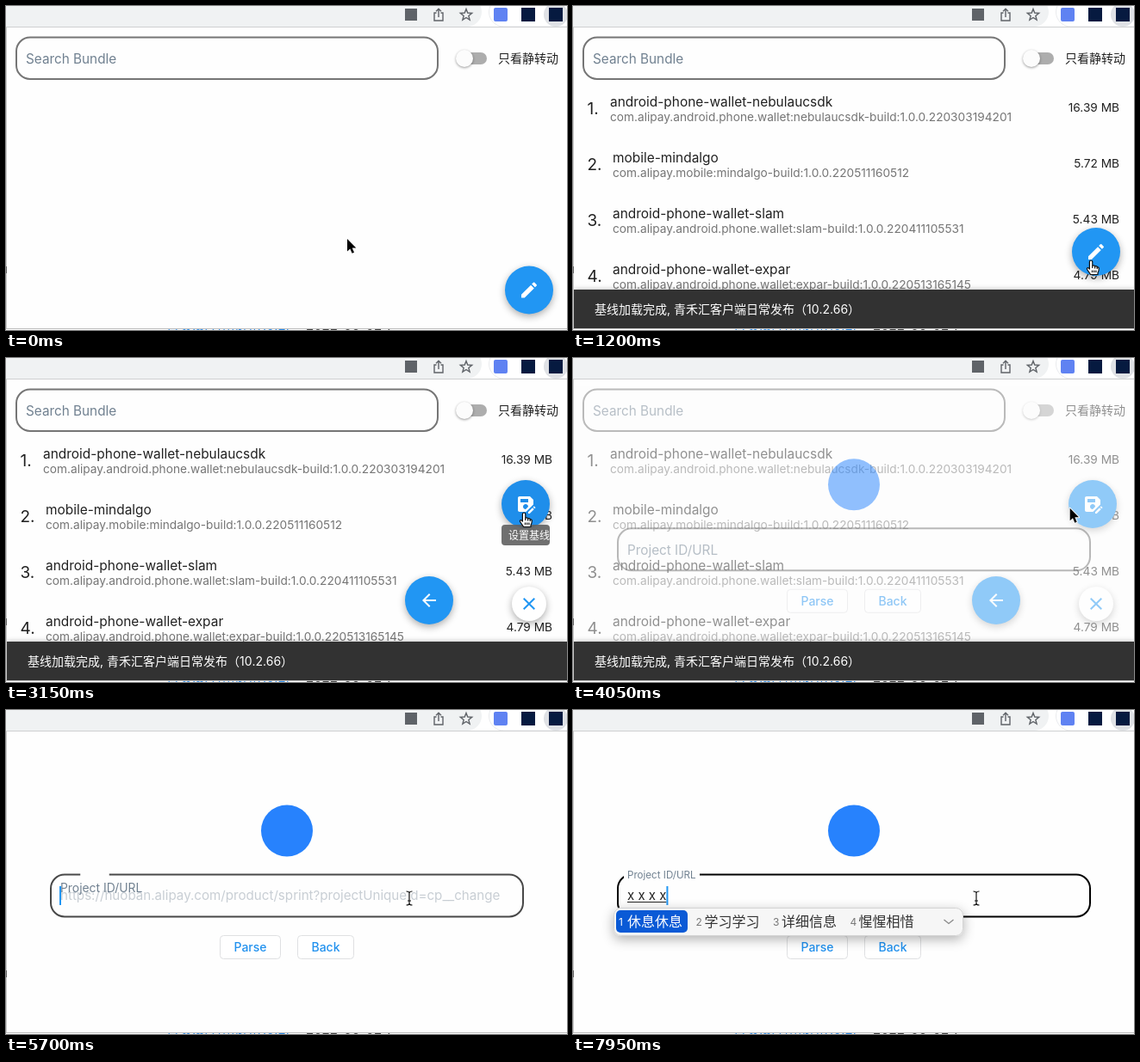
Recreate the animation shown at these times as an HTML page with a canvas. Size 651x377 px, loop 8000 ms.

```html
<!DOCTYPE html>
<html lang="zh-CN">
<head>
<meta charset="utf-8">
<title>Bundle panel</title>
<style>
html, body { margin: 0; width: 100%; height: 100%; overflow: hidden; background: #fff; }
canvas { display: block; width: 651px; height: 377px; }
</style>
</head>
<body>
<canvas id="stage"></canvas>
<script>
const W = 651, H = 377, LOOP = 8000;
const BLUE = '#2196f3', SLATE = '#708090';
const FONT = 'Inter, "Noto Sans CJK SC", "Noto Sans CJK", sans-serif';
const canvas = document.getElementById('stage');
const ctx = canvas.getContext('2d');
const dpr = window.devicePixelRatio || 1;
canvas.width = W * dpr;
canvas.height = H * dpr;

const ICONS = {
  edit: 'M3 17.25V21h3.75L17.81 9.94l-3.75-3.75L3 17.25zM20.71 7.04a1 1 0 0 0 0-1.41l-2.34-2.34a1 1 0 0 0-1.41 0l-1.83 1.83 3.75 3.75 1.83-1.83z',
  back: 'M20 11H7.83l5.59-5.59L12 4l-8 8 8 8 1.41-1.41L7.83 13H20v-2z',
  close: 'M19 6.41L17.59 5 12 10.59 6.41 5 5 6.41 10.59 12 5 17.59 6.41 19 12 13.41 17.59 19 19 17.59 13.41 12z',
  saveAs: 'M21 12.4V7l-4-4H5c-1.11 0-2 .9-2 2v14c0 1.1.89 2 2 2h7.4L21 12.4zM15 15v.06L12.06 18H12c-1.66 0-3-1.34-3-3s1.34-3 3-3 3 1.34 3 3zM6 6h9v4H6V6zm13.99 10.25l1.77 1.77L16.77 23H15v-1.77l4.99-4.98zm3.26.26l-.85.85-1.77-1.77.85-.85c.2-.2.51-.2.71 0l1.06 1.06c.2.2.2.51 0 .71z'
};
for (const k in ICONS) ICONS[k] = new Path2D(ICONS[k]);
const ARROW = new Path2D('M0 0V14.5L3.3 11.4L5.6 16.8L8 15.8L5.7 10.5H10.3Z');
const HAND = new Path2D('M0 0C1.2 0 1.8.8 1.8 2V6.2C2.4 5.6 4.4 5.8 4.6 6.9C5.2 6.3 7 6.6 7.2 7.8C8 7.4 9.3 8 9.3 9.4C9.3 12 8.6 13 8 14.5V16.5H-.5C-1.5 14-3.5 12.5-4.5 10.3C-4.9 9-3.6 8.2-2.6 9L-1.6 10V2C-1.6.8-1 0 0 0Z');

const BUNDLES = [
  ['android-phone-wallet-nebulaucsdk', 'com.alipay.android.phone.wallet:nebulaucsdk-build:1.0.0.220303194201', '16.39 MB'],
  ['mobile-mindalgo', 'com.alipay.mobile:mindalgo-build:1.0.0.220511160512', '5.72 MB'],
  ['android-phone-wallet-slam', 'com.alipay.android.phone.wallet:slam-build:1.0.0.220411105531', '5.43 MB'],
  ['android-phone-wallet-expar', 'com.alipay.android.phone.wallet:expar-build:1.0.0.220513165145', '4.79 MB']
];
const WORDS = ['休息休息', '学习学习', '详细信息', '惺惺相惜'];

// time, x, y, pointer shape
const POINTER = [
  [0, 396, 271, 'arrow'], [150, 396, 271, 'arrow'], [600, 582, 333, 'arrow'],
  [1080, 601, 302, 'hand'], [1190, 601, 296, 'hand'], [2800, 601, 296, 'hand'],
  [2920, 601, 262, 'arrow'], [3090, 601, 190, 'hand'], [3150, 601, 180, 'hand'],
  [3560, 601, 177, 'hand'], [3860, 601, 177, 'arrow'], [4300, 545, 172, 'arrow'],
  [4660, 545, 172, 'ibeam'], [4800, 531, 197, 'ibeam'], [5220, 468, 219, 'ibeam']
];
// row, from, to
const HOVERS = [[3, 440, 1060], [3, 2850, 2920], [2, 2920, 3040]];
const KEYS = [7330, 7600, 7750, 7900];

const clamp = v => Math.max(0, Math.min(1, v));
const ramp = (t, from, len) => clamp((t - from) / len);
const mix = (a, b, p) => a + (b - a) * p;
const smooth = p => p * p * (3 - 2 * p);
const easeOut = p => 1 - (1 - p) ** 2;

// cubic-bezier(.4, 0, .2, 1)
function standard(x) {
  let lo = 0, hi = 1;
  for (let i = 0; i < 20; i++) {
    const s = (lo + hi) / 2, r = 1 - s;
    if (1.2 * r * r * s + 0.6 * r * s * s + s ** 3 < x) lo = s; else hi = s;
  }
  return lo * lo * (3 - 2 * lo);
}

function rect(x, y, w, h, color) {
  ctx.fillStyle = color;
  ctx.fillRect(x, y, w, h);
}
function round(x, y, w, h, r, fill, stroke, line = 1) {
  ctx.beginPath();
  ctx.roundRect(x, y, w, h, r);
  if (fill) { ctx.fillStyle = fill; ctx.fill(); }
  if (stroke) { ctx.strokeStyle = stroke; ctx.lineWidth = line; ctx.stroke(); }
}
function disc(x, y, r, color) {
  ctx.beginPath();
  ctx.arc(x, y, r, 0, Math.PI * 2);
  ctx.fillStyle = color;
  ctx.fill();
}
function text(s, x, y, size, color, align = 'left', weight = 400) {
  ctx.font = `${weight} ${size}px ${FONT}`;
  ctx.textAlign = align;
  ctx.fillStyle = color;
  ctx.fillText(s, x, y);
}
function group(alpha, draw) {
  if (alpha <= 0) return;
  ctx.save();
  ctx.globalAlpha *= alpha;
  draw();
  ctx.restore();
}
function shadow(blur, dy, alpha, draw) {
  ctx.save();
  ctx.shadowColor = `rgba(0,0,0,${alpha})`;
  ctx.shadowBlur = blur * dpr;
  ctx.shadowOffsetY = dy * dpr;
  draw();
  ctx.restore();
}
function button(x, y, r, fill, icon, color, scale = 1, angle = 0) {
  shadow(8, 3, 0.32, () => disc(x, y, r, fill));
  ctx.save();
  ctx.translate(x, y);
  ctx.rotate(angle);
  ctx.scale(scale, scale);
  ctx.translate(-12, -12);
  ctx.fillStyle = color;
  ctx.fill(ICONS[icon]);
  ctx.restore();
}

function toolbar() {
  rect(0, 0, W, 25, '#fff');
  round(-20, -10, 572, 34, 17, '#f0f2f3');
  round(560.5, -10, 120, 34, 17, '#fff', '#e9ebee');
  disc(638, 10, 14, '#dfe1e5');
  rect(463, 3, 14, 14, '#5f6368');
  ctx.strokeStyle = '#5f6368';
  ctx.lineWidth = 1.4;
  ctx.beginPath();
  ctx.moveTo(499.5, 8); ctx.lineTo(497, 8); ctx.lineTo(497, 17); ctx.lineTo(507, 17);
  ctx.lineTo(507, 8); ctx.lineTo(504.5, 8);
  ctx.moveTo(502, 13); ctx.lineTo(502, 3.5);
  ctx.moveTo(499, 6.3); ctx.lineTo(502, 3.3); ctx.lineTo(505, 6.3);
  ctx.stroke();
  ctx.beginPath();
  for (let i = 0; i < 10; i++) {
    const a = Math.PI * (i / 5 - 0.5), r = i % 2 ? 3 : 7;
    ctx.lineTo(534 + r * Math.cos(a), 10.5 + r * Math.sin(a));
  }
  ctx.closePath();
  ctx.stroke();
  round(566, 2, 16, 16, 2, '#5f82f2');
  rect(598, 2, 16, 16, '#061a40');
  rect(630, 2, 16, 16, '#061a40');
}

function backdrop() {
  rect(0, 0, W, H, '#fff');
  text('日安@应用市场(10.2)', 186, 377, 15, '#2b8cea');
  text('2022-06-02 1', 348, 377, 15, '#444');
  rect(0, 24, W, 351, '#fefefe');
  toolbar();
  rect(0, 24, W, 1, '#cfd0d1');
  rect(0, 25, 1, 350, '#c9c9c9');
  rect(0, 303, 1, 8, '#666');
  rect(0, 375, W, 1, '#bdbdbd');
}

function bundleRow(i, hover) {
  const [name, id, size] = BUNDLES[i], y = 86 + 65 * i;
  if (hover > 0) rect(1, y, 650, 65, `rgba(0,0,0,${0.05 * hover})`);
  text(`${i + 1}.`, 16.5, y + 40, 19, '#212121');
  const x = i ? 46 : 43;
  text(name, x, y + 31, 15.45, '#212121');
  text(id, x, y + 48, 13.7, '#757575');
  text(size, 634, y + 37, 13.7, '#212121', 'right');
}

function tooltip(y, alpha) {
  group(alpha, () => {
    round(575, y, 56, 24, 4, 'rgba(97,97,97,.9)');
    text('设置基线', 583, y + 16.5, 12, '#fff');
  });
}

function speedDial(t, y) {
  const v = ramp(t, 1850, 250);
  if (v === 0) {
    button(607, y, 28, BLUE, 'edit', '#fff');
    return;
  }
  const p = standard(v), spin = (1 - p) * Math.PI / 2;
  const over = t > 3110 && t < 3900;
  button(607, y, 20, '#fff', 'close', BLUE);
  group(p, () => {
    button(603 - 112 * p, 282, 28, BLUE, 'back', '#fff', 1, spin);
    button(603, 282 - 112 * p, 28, over ? '#1f8eea' : BLUE, 'saveAs', '#fff', 1, spin);
  });
  const scale = mix(1, 0.7, easeOut(ramp(v, 0, 0.5)));
  group(1 - smooth(ramp(v, 0.15, 0.85)), () => button(607, y, 28 * scale, BLUE, 'edit', '#fff', scale));
  tooltip(306, 0.85 * ramp(t, 1880, 60) * (1 - ramp(t, 2100, 120)));
  tooltip(194, ramp(t, 3090, 60) * (1 - ramp(t, 3800, 150)));
}

function listPage(t, snackTop) {
  round(12, 36.5, 489, 48.5, 16, '#fefefe', '#757575', 2);
  text('Search Bundle', 23, 67, 15.3, SLATE);
  round(524, 54, 34, 14, 7, '#adadad');
  shadow(3, 1, 0.4, () => disc(532, 61, 10, '#fcfcfc'));
  text('只看静转动', 571, 66, 14, '#212121');
  if (t >= 430) {
    BUNDLES.forEach((_, i) => {
      let hover = 0;
      for (const [row, from, to] of HOVERS)
        if (row === i) hover = Math.max(hover, ramp(t, from, 50) * (1 - ramp(t, to, 100)));
      bundleRow(i, hover);
    });
  }
  speedDial(t, snackTop - 44);
}

function outlinedButton(label, x, w) {
  round(x + 0.5, 262.5, w - 1, 27, 4, '#fff', '#dfe0e2');
  text(label, x + w / 2, 281, 14, '#2191ee', 'center', 500);
}

function field(focus) {
  ctx.save();
  if (focus > 0) {
    // notch for the floating label
    ctx.beginPath();
    ctx.rect(0, 150, W, 150);
    ctx.rect(mix(103, 59, focus), 180, 88 * focus, 20);
    ctx.clip('evenodd');
  }
  const g = Math.round(117 * (1 - focus));
  round(52, 191.5, 548, 49, 16, null, `rgb(${g},${g},${g})`, 2);
  ctx.restore();
  text('Project ID/URL', 63, mix(222, 196, focus), mix(15.3, 11.6, focus), SLATE);
}

function candidates(n) {
  const pitch = 16 * n + 25.5, width = pitch * 4 + 48;
  shadow(14, 4, 0.3, () => round(47, 230, width, 33, 8, '#f6f6f6'));
  round(47.5, 230.5, width - 1, 32, 8, null, '#d4d4d4');
  round(50, 233, 16 * n + 19, 26, 5, '#0a5ad6');
  WORDS.forEach((word, i) => {
    const x = 53 + pitch * i;
    text(i + 1, x, 251, 12, i ? '#777' : '#fff');
    text(word.slice(0, n), x + 10, 252, 16, i ? '#333' : '#fff');
  });
  const cx = 47 + width - 17;
  ctx.strokeStyle = '#888';
  ctx.lineWidth = 1.3;
  ctx.beginPath();
  ctx.moveTo(cx - 5.5, 244); ctx.lineTo(cx, 248.5); ctx.lineTo(cx + 5.5, 244);
  ctx.stroke();
}

function projectPage(t) {
  rect(1, 25, 650, 350, '#fefefe');
  disc(326, 140.5, 30, '#2782fd');
  const focus = standard(ramp(t, 5640, 200));
  field(focus);
  outlinedButton('Parse', 248, 71);
  outlinedButton('Back', 338, 66);

  const typed = KEYS.filter(k => t >= k).length;
  group(focus * (1 - ramp(t, KEYS[0], 140)), () =>
    text('https://huoban.alipay.com/product/sprint?projectUniqueId=cp__change', 63, 221, 15.15, SLATE));
  let caretX = 62;
  if (typed) {
    const str = Array(typed).fill('x').join(' ');
    text(str, 63, 221, 15, '#212121');
    const w = ctx.measureText(str).width;
    rect(63, 223, w, 1, '#212121');
    caretX = 63 + w;
  }
  const blink = 1 - ramp(t, 6250, 120) + ramp(t, 6850, 120);
  group(t > 5660 ? blink : 0, () => rect(caretX, 205, 2, 22, BLUE));
  if (typed) candidates(typed);
}

function snackbar(t, top) {
  if (top >= 374.5) return;
  ctx.save();
  ctx.beginPath();
  ctx.rect(1, 25, 650, 350);
  ctx.clip();
  shadow(6, 0, 0.3, () => rect(1, top, 650, 50, '#323232'));
  group(ramp(t, 605, 100), () =>
    text('基线加载完成, 青禾汇客户端日常发布（10.2.66）', 25, top + 27.5, 14, '#fff'));
  ctx.restore();
}

function pointer(t) {
  let i = 0;
  while (i < POINTER.length - 1 && POINTER[i + 1][0] <= t) i++;
  const a = POINTER[i], b = POINTER[i + 1] || a;
  const p = b === a ? 0 : ramp(t, a[0], b[0] - a[0]);
  ctx.save();
  ctx.translate(mix(a[1], b[1], p), mix(a[2], b[2], p));
  ctx.lineJoin = 'round';
  if (a[3] === 'ibeam') {
    const beam = new Path2D('M-3.5-8Q0-8 0-6Q0-8 3.5-8M0-6V6M-3.5 8Q0 8 0 6Q0 8 3.5 8M-2 3H2');
    ctx.strokeStyle = '#fff';
    ctx.lineWidth = 2.6;
    ctx.stroke(beam);
    ctx.strokeStyle = '#111';
    ctx.lineWidth = 1.2;
    ctx.stroke(beam);
  } else if (a[3] === 'hand') {
    ctx.fillStyle = '#fff';
    ctx.strokeStyle = '#111';
    ctx.lineWidth = 1.2;
    ctx.fill(HAND);
    ctx.stroke(HAND);
    ctx.stroke(new Path2D('M1.8 6V9M4.6 7V9.5M7.2 8V10M1.5 11.5V14M3.7 11.5V14M5.9 11.5V14'));
  } else {
    ctx.strokeStyle = '#fff';
    ctx.lineWidth = 2;
    ctx.stroke(ARROW);
    ctx.fillStyle = '#000';
    ctx.fill(ARROW);
  }
  ctx.restore();
}

function draw(t) {
  ctx.setTransform(dpr, 0, 0, dpr, 0, 0);
  const rise = standard(t < 3000 ? ramp(t, 457, 250) : 1 - ramp(t, 4688, 250));
  const snackTop = mix(374.5, 330, rise);
  const route = ramp(t, 3850, 300);
  backdrop();
  if (route < 1) listPage(t, snackTop);
  if (route > 0) {
    ctx.save();
    ctx.beginPath();
    ctx.rect(1, 25, 650, 350);
    ctx.clip();
    ctx.translate(0, 88 * (1 - standard(route)));
    group(route ** 1.7, () => projectPage(t));
    ctx.restore();
  }
  snackbar(t, snackTop);
  pointer(t);
}

const start = performance.now();
function tick() {
  draw((performance.now() - start) % LOOP);
  requestAnimationFrame(tick);
}
tick();
</script>
</body>
</html>
```
